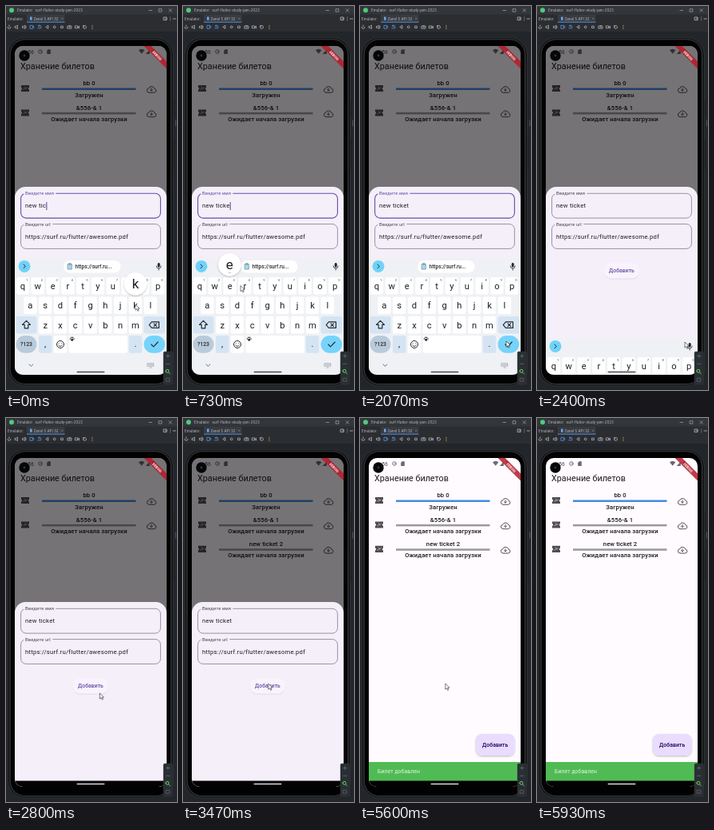
Recreate the animation shown at these times as an HTML page. Size 214x480 px, loop 6790 ms.

```html
<!DOCTYPE html>
<html lang="ru">
<head>
<meta charset="utf-8">
<title>Хранение билетов</title>
<style>
html, body { margin: 0; width: 100%; height: 100%; overflow: hidden; background: #22252a; }
svg { display: block; width: 214px; height: 480px; font-family: Roboto, "Noto Sans", sans-serif; }
text { white-space: pre; }
.line { fill: none; stroke-linecap: round; stroke-linejoin: round; }
.mid { text-anchor: middle; }
.med { font-weight: 500; }
.field { font-size: 7.7px; letter-spacing: .24px; fill: #1d1b20; }
.label { font-size: 5.8px; letter-spacing: .12px; }
.row { font-size: 7.7px; font-weight: 500; letter-spacing: .07px; fill: #1d1b20; }
.key { font-size: 11.2px; fill: #1c1f24; }
.ui { font-family: Inter, "Open Sans", sans-serif; font-size: 4.5px; fill: #b9bcc1; }
</style>
</head>
<body>
<svg id="stage" viewBox="0 0 214 480"></svg>
<script>
const LOOP = 6790;
const stage = document.getElementById('stage');

const rect = (x, y, w, h, r, fill, extra = '') =>
  `<rect x="${x}" y="${y}" width="${w}" height="${h}" rx="${r}" fill="${fill}" ${extra}/>`;
const circle = (x, y, r, fill, extra = '') =>
  `<circle cx="${x}" cy="${y}" r="${r}" fill="${fill}" ${extra}/>`;
const line = (d, color, w = .8) =>
  `<path class="line" d="${d}" stroke="${color}" stroke-width="${w}"/>`;
const text = (x, y, s, cls = '', extra = '') =>
  `<text x="${x}" y="${y}" class="${cls}" ${extra}>${s}</text>`;
const group = (id, body, extra = '') => `<g id="${id}" ${extra}>${body}</g>`;

function windowBars() {
  const c = '#b9bcc1';
  const tools = [
    'M-2 0a2 2 0 1 0 4 0M0-2.5v2', 'M-2-1h1.5l1.5-1.3v4.6L-.5 1H-2z', 'M-2-1h1.5l1.5-1.3v4.6L-.5 1H-2zM2-1v2',
    'M-2-2h3v4h-3zM1-1h1.5v2', 'M-2 1.5h4v-3h-3M0-2.5l-1.5 1 1.5 1', 'M1.3-1.8L-1.5 0l2.8 1.8z',
    'M-1.4 0a1.4 1.4 0 1 0 2.8 0a1.4 1.4 0 1 0-2.8 0', 'M-1.2-1.2h2.4v2.4h-2.4z',
    'M-2.4-1.2h4.8v3h-4.8zM-.7-1.8h1.4M-.6.3h1.2', 'M-2.4-1.4h3v2.8h-3zM.8 0l1.7-1.2v2.4z',
    'M-2 0a2 2 0 1 0 .8-1.6M-2-2v1.4h1.3', 'M0-2v.1M0 0v.1M0 2v.1'
  ].map((d, i) => `<g transform="translate(${4 + i * 9.45} 26.3)">${
    line(d, i === 3 || i === 4 ? '#5a9bf0' : i === 11 ? '#e6a54a' : c, i === 11 ? 1.1 : .75)}</g>`).join('');
  return rect(0, 0, 214, 32, 0, '#2b2d31') + rect(0, 0, 214, 10.6, 0, '#33363a')
    + circle(7, 5.3, 3, '#4fca7c')
    + text(14, 7, 'Emulator:  surf-flutter-study-jam-2023', 'ui')
    + line('M179 5.5h3.6M191.5 3.7h3.4v3.4h-3.4zM204 3.7l3.4 3.4m0-3.4l-3.4 3.4', c, .6)
    + text(2, 17.6, 'Emulator:', 'ui') + rect(26, 11, 47.5, 9.6, 0, '#383b40')
    + rect(30, 13.6, 2.6, 4.2, .5, '#6aa5e8') + text(34.5, 17.6, 'Zanel 5 API 32', 'ui')
    + line('M69.2 14.7l2.2 2.2m0-2.2l-2.2 2.2', '#8b9097', .5) + rect(26, 19.6, 47.5, 1.2, 0, '#4a80c4')
    + line('M197.5 14h3.6v3.6h-3.6zM199.3 15.8h1.6M205.6 14v.1M205.6 15.9v.1M205.6 17.8v.1M209 16h3.4', c, .8)
    + tools;
}

function device() {
  return rect(208, 118, 2.5, 22, 1, '#15171a') + rect(208, 165, 2.5, 40, 1, '#15171a')
    + line('M212.5 143v7', '#6e747c', .6)
    + rect(2, 39.3, 207.5, 435.7, 22, '#17181a', 'stroke="#34363a" stroke-width=".8"')
    + rect(5.2, 41.8, 201.2, 430.8, 19, '#020203', 'stroke="#47494d" stroke-width=".8"');
}

function ticket(i, name, state, color) {
  const y = i * 30.4;
  return group('ticket' + i,
    `<path d="M19 99h10v2.7a1.5 1.5 0 0 0 0 2.9v2.5H19v-2.5a1.5 1.5 0 0 0 0-2.9z" fill="#504d55"/>`
    + line('M21.6 104.2l4.8-2M23 101.2l1.8 1.6', '#e4e0e6', .6)
    + text(104, 99.4, name, 'row mid') + rect(45, 102.5, 117.5, 2.5, 0, color)
    + text(104, 113.6, state, 'row mid')
    + line('M178.6 108.2a2.7 2.7 0 0 1 0-5.3a3.9 3.9 0 0 1 7.3.4a2.5 2.5 0 0 1 0 4.9z', '#49454f', .95)
    + line('M182 102.9v3.2m-1.5-1.4l1.5 1.5 1.5-1.5', '#49454f', .9),
    `transform="translate(0 ${y})"`);
}

function page() {
  const grey = '#9b999e', s = '#6c6970';
  return rect(11, 50, 190, 412, 0, '#fffbff')
    + text(25.5, 59.8, ':56', 'med', `font-size="6.6" fill="${s}"`)
    + circle(43, 57, 2.3, 'none', `stroke="${s}" stroke-width=".9"`) + line('M43 57h2', s)
    + `<path d="M51.2 60v-4.2l1.6-1.6h3V60z" fill="${s}"/>`
    + `<path d="M166 55.3q3.7-3 7.4 0l-3.7 4.5zM174.8 60l5-5.5v5.5z" fill="${s}"/>` + rect(183, 54, 3, 6, .6, s)
    + text(18, 78.7, 'Хранение билетов', '', 'font-size="10.8" fill="#1d1b20"')
    + ticket(0, 'bb 0', 'Загружен', '#4689e2')
    + ticket(1, '&amp;556-&amp; 1', 'Ожидает начала загрузки', grey)
    + ticket(2, 'new ticket 2', 'Ожидает начала загрузки', grey)
    + group('fab', rect(145, 395, 48.5, 27, 7.5, '#e8ddfe', 'filter="url(#shadow)"')
      + text(169.2, 411.2, 'Добавить', 'mid med', 'font-size="6.9" letter-spacing=".05" fill="#21005d"'))
    + group('snack', rect(11, 430, 190, 24, 0, '#50bb54')
      + text(22, 444.2, 'Билет добавлен', '', 'font-size="6.8" letter-spacing=".12" fill="#e4f5e4"'));
}

function input(id, y, label, value, labelWidth) {
  return rect(18.6, y, 174.8, 30.8, 6.5, 'none', `id="${id}Box"`)
    + rect(22.3, y - 2, labelWidth, 4, 0, '#f5effa')
    + text(24, y + 2, label, 'label', `id="${id}Label"`)
    + text(24, y + 18, value, 'field', `id="${id}Text"`);
}

function sheet() {
  return `<path d="M11 470V239.5a13.5 13.5 0 0 1 13.5-13.5h163a13.5 13.5 0 0 1 13.5 13.5V470z" fill="#f5effa"/>`
    + input('name', 234.3, 'Введите имя', 'new ticket', 40)
    + input('url', 272.6, 'Введите url', 'https://surf.ru/flutter/awesome.pdf', 36)
    + rect(0, 245.1, 1.1, 10, 0, '#6750a4', 'id="caret"')
    + rect(83, 321, 46, 19.4, 9.7, '#f8f3fc', 'filter="url(#soft)"')
    + text(106, 333, 'Добавить', 'mid med', 'font-size="6.8" letter-spacing=".05" fill="#6750a4"');
}

function keyRow(letters, x0, y, digits) {
  return [...letters].map((c, i) => {
    const x = x0 + i * 18.8;
    return rect(x - 8.2, y, 16.4, 21.6, 2.5, '#fff')
      + text(x, y + 14.8, c, 'key mid')
      + (digits ? text(x + 5.2, y + 5.4, (i + 1) % 10, 'mid', 'font-size="4.2" fill="#4a4e55"') : '');
  }).join('');
}

function keyboard() {
  const ink = '#25292e', soft = '#d5e4f3';
  return rect(11, 315.5, 190, 146.5, 0, '#eff1f4')
    + circle(23, 325.4, 7.5, '#70d2fa') + line('M22 323l2.4 2.4-2.4 2.4', ink, 1)
    + group('chip', rect(72, 318, 71.5, 15.4, 7.7, '#fff')
      + rect(77.2, 322.4, 5.4, 6.8, .8, '#a9d8ee') + line('M77.4 322.6h5v6.4h-5zM78.8 322v1.2h2.2V322z', '#5d8496', .6)
      + text(86.6, 328.2, 'https://surf.ru...', 'med', 'font-size="6.5" fill="#25292e"'))
    + rect(189.7, 321, 3, 5.6, 1.5, ink) + line('M188.2 325a3 3 0 0 0 6 0M191.2 328.2v2', ink, .8)
    + keyRow('qwertyuiop', 21, 339, true) + keyRow('asdfghjkl', 30.4, 363.4)
    + keyRow('zxcvbnm', 49.2, 387.8)
    + rect(12.5, 387.8, 26, 21.6, 3, soft) + line('M25.5 393.4l5 5h-2.7v4.4h-4.6v-4.4h-2.7z', ink, 1.15)
    + rect(172.5, 387.8, 26.5, 21.6, 3, soft)
    + line('M179.2 398.6l3.2-3.8h9v7.6h-9zM185 396.8l3.6 3.6m0-3.6l-3.6 3.6', ink, 1.15)
    + rect(12.5, 412, 26, 21.8, 10.9, '#b9cbdb') + text(25.5, 425.4, '?123', 'mid med', `font-size="6.8" fill="${ink}"`)
    + rect(41, 412, 16.4, 21.8, 2.5, soft) + text(49.2, 426, ',', 'key mid')
    + rect(59.8, 412, 16.4, 21.8, 2.5, '#fff') + circle(68, 423, 4.5, 'none', `stroke="${ink}"`)
    + line('M66.2 421.7v.1M69.8 421.7v.1M65.7 424q2.3 3 4.6 0', ink, .9)
    + rect(78.6, 412, 73.4, 21.8, 2.5, '#fff')
    + [[80.4, 416], [81.8, 414.4], [83.6, 414.4], [85, 416]].map(p => circle(...p, .8, ink)).join('')
    + circle(82.7, 417.3, 1.5, ink)
    + rect(153.8, 412, 16.4, 21.8, 2.5, soft) + text(162, 426, '.', 'key mid')
    + rect(172.5, 412, 26.5, 21.8, 10.9, '#76d3fb') + line('M181.8 423l2.8 2.8 5.6-5.8', ink, 1.1)
    + line('M29 448l2.4 2.3 2.4-2.3', '#5c6168', .9)
    + line('M177.3 446.8h7.4v3.4h-7.4zM178.8 448.4h4.4M180 452h2', '#7c8188', .6);
}

function banner() {
  return `<g transform="translate(201 50) rotate(45)">`
    + rect(-21, 13.7, 42, 6.4, 0, '#b71c2a', 'opacity=".85"')
    + text(0, 18.6, 'DEBUG', 'mid', 'font-size="4.6" font-weight="900" fill="#f3dfe1"') + '</g>';
}

function sidePanel() {
  return rect(197, 432, 11.4, 41, 1.5, '#2b2e33', 'stroke="#3a3e44" stroke-width=".4"')
    + line('M200.5 437.5h4.4M202.7 435.4v4.2', '#3d8a85', .7) + line('M200.5 447.3h4.4', '#3d8a85', .7)
    + line('M199.9 456.3a2 2 0 1 0 4 0a2 2 0 1 0-4 0M203.4 457.8l2 2', '#62d35d', 1)
    + line('M200.5 465.3h4.2v3.8h-4.2z', '#6e757d', .6);
}

const shadow = (id, dy, blur, alpha) => `<filter id="${id}" x="-20%" y="-30%" width="140%" height="180%">
  <feDropShadow dx="0" dy="${dy}" stdDeviation="${blur}" flood-color="#000" flood-opacity="${alpha}"/></filter>`;

stage.innerHTML = `<defs>
  <clipPath id="glass"><rect x="11" y="50" width="190" height="411" rx="10"/></clipPath>
  ${shadow('shadow', 1, 1.1, .28)}${shadow('soft', .5, .6, .2)}
  </defs>`
  + windowBars() + device()
  + `<g clip-path="url(#glass)">` + page()
  + rect(11, 50, 190, 412, 0, '#000', 'id="scrim"')
  + group('sheet', sheet()) + rect(11, 453.5, 190, 8.5, 0, '#030304')
  + group('keyboard', keyboard())
  + group('popup', circle(0, 0, 14.2, '#fff', 'filter="url(#shadow)"')
    + text(0, 5.6, '', 'mid', 'id="popupKey" font-size="17" fill="#1c1f24"')
    + text(0, 11, '…', 'mid', 'id="popupMore" font-size="6" fill="#1c1f24"'))
  + rect(88.5, 456.8, 35, 1.5, .75, '#fff', 'id="handle"') + banner() + '</g>'
  + circle(23, 62, 6.7, '#050607') + circle(23, 62, 1.4, '#2a3a40')
  + sidePanel()
  + group('mouse', `<path d="M0 0v7.2l1.7-1.5 1.2 2.6 1.2-.6-1.2-2.5h2.3z" fill="#fff" stroke="#222" stroke-width=".6"/>`);

const el = {};
stage.querySelectorAll('[id]').forEach(n => el[n.id] = n);
const set = (id, attrs) => { for (const k in attrs) el[id].setAttribute(k, attrs[k]); };
const show = (id, on) => set(id, { opacity: +on });
const move = (id, x, y) => set(id, { transform: `translate(${x} ${y})` });
const within = (t, a, b) => t >= a && t < b;
const progress = (t, a, b) => Math.min(1, Math.max(0, (t - a) / (b - a)));
const smooth = p => p * p * (3 - 2 * p);

// time, x, y
const mousePath = [
  [0, 162, 373], [130, 162, 373], [530, 72, 349.5], [800, 72, 349.5], [1000, 96, 349],
  [1400, 96, 349], [1870, 187, 420], [2070, 183, 419], [2270, 183, 419], [2400, 185, 420],
  [2470, 185, 420], [2900, 106.8, 332], [LOOP, 106.8, 332]
];
// start, end, letter, x, y
const presses = [[0, 100, 'k', 162, 347.3], [670, 860, 'e', 58.3, 323.2], [1230, 1400, 't', 96.2, 323.2]];

function mouseAt(t) {
  const i = Math.max(1, mousePath.findIndex(p => p[0] > t));
  const [a, b] = [mousePath[i - 1], mousePath[i]];
  const p = smooth(progress(t, a[0], b[0]));
  return [a[1] + (b[1] - a[1]) * p, a[2] + (b[2] - a[2]) * p];
}

function render(t) {
  const typed = t < 70 ? 7 : t < 670 ? 8 : t < 1230 ? 9 : 10;
  const focused = t < 2300;
  el.nameText.textContent = 'new ticket'.slice(0, typed);
  set('nameBox', { stroke: focused ? '#6750a4' : '#79747e', 'stroke-width': focused ? 1.1 : .75 });
  set('urlBox', { stroke: '#79747e', 'stroke-width': .75 });
  set('nameLabel', { fill: focused ? '#6750a4' : '#49454f' });
  set('urlLabel', { fill: '#49454f' });
  set('caret', { x: 24.2 + el.nameText.getComputedTextLength() });
  show('caret', t < 1800);

  const press = presses.find(p => within(t, p[0], p[1]));
  show('popup', !!press);
  if (press) {
    move('popup', press[3], press[4]);
    el.popupKey.textContent = press[2];
    show('popupMore', press[2] !== 'k');
  }

  const hide = progress(t, 2270, 2570);
  move('keyboard', 0, 146.5 * (1 - (1 - hide) ** 2));
  show('chip', t < 2300);
  show('keyboard', hide < 1);
  set('handle', { fill: hide < 1 ? '#44474c' : '#d8d8da' });

  const closing = progress(t, 3490, 3590);
  move('sheet', 0, 4 * progress(t, 2560, 2700) + 232 * closing ** 2);
  show('sheet', closing < 1);
  set('scrim', { opacity: .54 * (1 - closing) });
  show('ticket2', t >= 3470);
  show('snack', t >= 3600);
  move('fab', 0, t < 3600 ? 24 : 0);

  move('mouse', ...mouseAt(t));
  set('mouse', { opacity: 1 - progress(t, 5840, 5930) });
}

const start = performance.now();
function frame() {
  render((performance.now() - start) % LOOP);
  requestAnimationFrame(frame);
}
frame();
</script>
</body>
</html>
```
